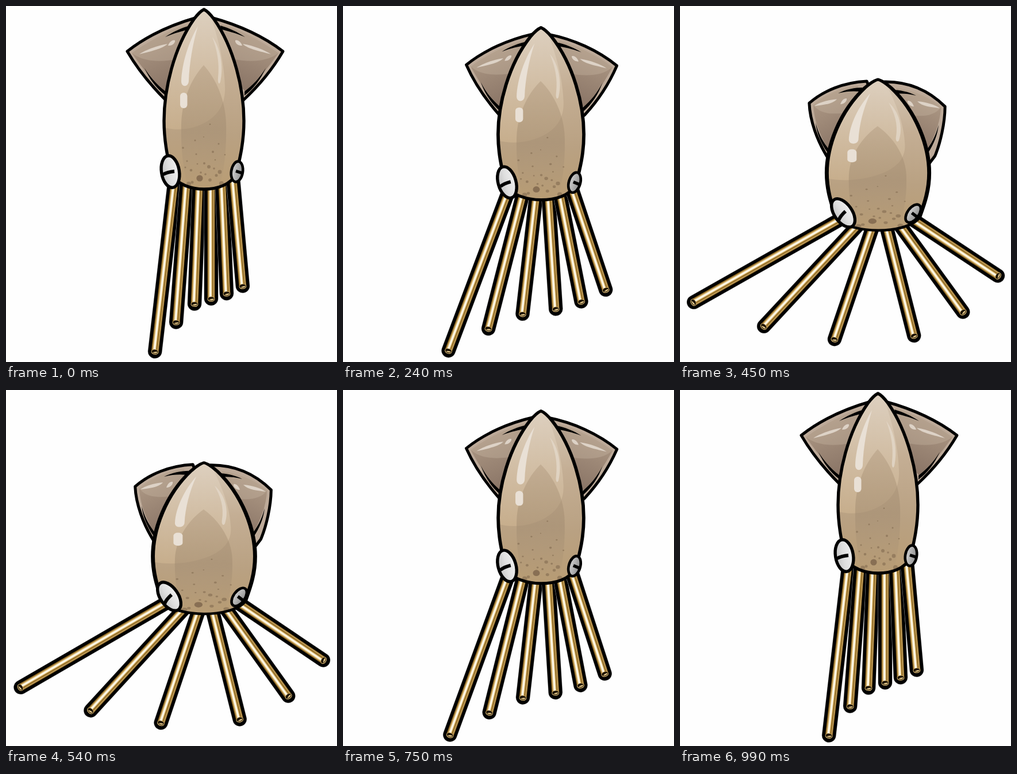
Write an HTML page that moves like this. It is 576 by 620 pixels and loops after 1020 ms.

```html
<!DOCTYPE html>
<html lang="en">
<head>
<meta charset="utf-8">
<title>Squid</title>
<style>
  html, body { margin: 0; width: 100%; height: 100%; overflow: hidden; background: #fefefe; }
  svg { display: block; width: 576px; height: 620px; }
</style>
</head>
<body>
<svg viewBox="0 0 576 620">
  <defs>
    <linearGradient id="skin" x1="0" y1="0" x2="0" y2="1">
      <stop offset="0" stop-color="#d6c8b6"/>
      <stop offset=".35" stop-color="#c4ae94"/>
      <stop offset=".7" stop-color="#b9a182"/>
      <stop offset="1" stop-color="#b99d74"/>
    </linearGradient>
    <linearGradient id="glow" x1="0" y1="0" x2="0" y2="1">
      <stop offset="0" stop-color="#dfd2c2"/>
      <stop offset="1" stop-color="#c9b08e"/>
    </linearGradient>
    <linearGradient id="arch" x1="0" y1="0" x2="0" y2="1">
      <stop offset="0" stop-color="#a48c70" stop-opacity=".34"/>
      <stop offset=".5" stop-color="#a08a70" stop-opacity=".5"/>
      <stop offset="1" stop-color="#a08a70" stop-opacity="0"/>
    </linearGradient>
    <linearGradient id="panel" x1="0" y1="0" x2=".35" y2="1">
      <stop offset="0" stop-color="#b4a08c"/>
      <stop offset=".5" stop-color="#a18c7a"/>
      <stop offset="1" stop-color="#8c7768"/>
    </linearGradient>
    <linearGradient id="tube" gradientUnits="userSpaceOnUse" x1="-6.5" y1="0" x2="6.5" y2="0">
      <stop offset="0" stop-color="#6b4c14"/>
      <stop offset=".14" stop-color="#b18a40"/>
      <stop offset=".28" stop-color="#f3dfb0"/>
      <stop offset=".38" stop-color="#fffdf6"/>
      <stop offset=".5" stop-color="#fff6dd"/>
      <stop offset=".6" stop-color="#c9a256"/>
      <stop offset=".72" stop-color="#85601c"/>
      <stop offset=".86" stop-color="#cfab66"/>
      <stop offset="1" stop-color="#6b4c14"/>
    </linearGradient>
    <linearGradient id="white">
      <stop offset="0" stop-color="#c4c4c4"/>
      <stop offset=".45" stop-color="#dedede"/>
      <stop offset="1" stop-color="#f0f0f0"/>
    </linearGradient>
    <linearGradient id="grey">
      <stop offset="0" stop-color="#d2d2d2"/>
      <stop offset="1" stop-color="#8e8e8e"/>
    </linearGradient>
    <path id="shape" d="M344.5 6C338 9 333 15 327 23C292 73 275 145 275 200C275 235 281 262 287 290C296 312 325 319 344.5 319C366 319 392 312 401 291C408 262 414 235 414 200C414 145 397 73 362 23C356 15 351 9 344.5 6Z"/>
    <clipPath id="inside"><use href="#shape"/></clipPath>
  </defs>
  <g id="fins"></g>
  <g id="legs"></g>
  <g id="body">
    <use href="#shape" fill="url(#skin)"/>
    <g clip-path="url(#inside)">
      <path d="M260 205C290 221 325 216 350 201C374 186 382 165 381 140C380 105 372 60 350 0L260 0Z" fill="url(#glow)" opacity=".85"/>
      <path d="M344 103C322 127 306 165 305 205C304 250 308 285 318 325L370 325C380 285 384 250 383 205C382 165 366 127 344 103Z" fill="url(#arch)"/>
      <path d="M334 35C318 62 306 100 305 131C305 142 317 142 318 131C319 100 325 65 334 35Z" fill="#e9e0d5"/>
      <rect x="303" y="151" width="12.5" height="27" rx="6" fill="#e9e0d5"/>
      <path d="M359 54C373 72 379 105 373 132C371 138 368 134 369 125C372 98 367 76 359 54Z" fill="#e4d9ca" opacity=".8"/>
      <g id="spots" fill="#836b50"></g>
    </g>
    <use href="#shape" fill="none" stroke="#000" stroke-width="5.4" stroke-linejoin="round"/>
  </g>
  <g id="eyes" stroke="#000"></g>
</svg>
<script>
const LOOP = 1020, STEP = 30, HALF = 493;
// Squeeze amount at which the second pose of every pair is drawn
const POSE = 0.95;

const $ = id => document.getElementById(id);
const add = (parent, tag, attrs) => {
  const el = document.createElementNS('http://www.w3.org/2000/svg', tag);
  for (const k in attrs) el.setAttribute(k, attrs[k]);
  return parent.appendChild(el);
};
const lerp = (a, b, k) => a + (b - a) * k;
const NUM = /-?\d+(\.\d+)?/g;
// Blend every number of two strings that share one structure
const blend = (a, b, k) => {
  const to = b.match(NUM);
  let i = 0;
  return a.replace(NUM, v => lerp(+v, +to[i++], k).toFixed(2));
};

// Elements whose attribute moves between two poses
const tweens = [];
const tween = (el, attr, a, b) => tweens.push({ el, attr, a, b });

// Fins
const outlines = [
  ['M332 20C290 32 245 52 211 79C228 108 252 138 277 163L310 190L344 60Z',
   'M325 132C285 134 250 148 225 170C226 200 238 235 258 267L290 280L344 180Z'],
  ['M357 20C401 32 447 52 482 79C465 108 441 138 413 164L380 190L344 60Z',
   'M355 133C403 132 436 151 461 176C461 205 453 240 444 262L432 278L344 180Z']
];
const details = [
  ['M318 32C285 42 250 60 219 82C236 106 256 132 276 150L320 100Z',
   'M310 140C285 143 255 153 232 173C233 198 243 228 258 250L300 200Z',
   { fill: 'url(#panel)' }],
  ['M318 32C285 42 250 60 219 82C240 98 270 98 300 92Z',
   'M310 140C285 143 255 153 232 173C245 190 265 190 300 186Z',
   { fill: '#c9b7a4', opacity: .35 }],
  ['M320 34C306 38 290 45 277 54C294 47 308 43 318 41Z',
   'M318 143C305 143 288 146 275 153C290 149 303 149 313 150Z',
   { fill: '#000' }],
  ['M241 108C252 126 264 138 278 149L278 156C262 144 250 128 241 108Z',
   'M236 204C241 224 249 238 260 252L260 261C247 244 238 224 236 204Z',
   { fill: '#000' }],
  ['M232 84C242 77 262 69 281 66C272 75 250 79 232 84Z',
   'M234 175C242 169 258 164 273 163C265 172 248 173 234 175Z',
   { fill: '#ddd2c6' }],
  ['M282 69C284 63 290 58 294 60C295 64 289 70 282 69Z',
   'M279 172C281 165 286 161 290 162C291 166 286 172 279 172Z',
   { fill: '#ddd2c6' }]
];
outlines.forEach(([a, b], side) => {
  tween(add($('fins'), 'path', { fill: '#bdaa99' }), 'd', a, b);
  const g = add($('fins'), 'g', {});
  if (side) tween(g, 'transform', 'translate(693 0) scale(-1 1)', 'translate(686 4) scale(-1 1)');
  for (const [c, d, look] of details) tween(add(g, 'path', look), 'd', c, d);
  const edge = add($('fins'), 'path', {
    fill: 'none', stroke: '#000', 'stroke-width': 5, 'stroke-linejoin': 'round'
  });
  tween(edge, 'd', a, b);
});

// Spots: x, y, radius
[
  [337, 300, 5.6], [353, 280, 3], [372, 289, 3.4], [366, 295, 2.5], [355, 303, 2.8],
  [322, 286, 2.3], [345, 274, 2], [360, 254, 2], [308, 247, 1.8], [329, 234, 1.5],
  [355, 206, 1.3], [344, 228, 1], [370, 240, 1.5], [331, 258, 1.5], [315, 270, 1.5],
  [362, 283, 1.8], [324, 307, 2.5], [339, 290, 1.8], [347, 293, 1.8], [381, 259, 1.3],
  [318, 310, 4], [375, 309, 4], [312, 281, 1.5], [333, 275, 1.3], [364, 268, 1.3]
].forEach(([cx, cy, r]) => add($('spots'), 'circle', { cx, cy, r, opacity: r > 5 ? .9 : .6 }));

// Legs: joint on the body, tip when long, tip when squeezed
const squeeze = p => ({ sx: 1 + .3 * p, sy: 1 - .17 * p, y: 320 + 76 * p });
const place = (x, y, p) => {
  const s = squeeze(p);
  return [344.5 + (x - 344.5) * s.sx, s.y + (y - 320) * s.sy];
};
const polar = ([x, y], ex, ey) => [Math.hypot(ex - x, ey - y), Math.atan2(x - ex, ey - y) * 180 / Math.PI];

const legs = [
  [294.7, 295, 259, 603, 21.5, 515],
  [314, 314, 296, 552, 144, 558.5],
  [336, 318, 328, 520, 268, 582],
  [357, 318, 357, 511, 408, 576],
  [376, 312, 384, 502, 494, 534],
  [395, 300, 412, 489, 555, 470]
].map(([x, y, ax, ay, bx, by]) => {
  const g = add($('legs'), 'g', {});
  const line = (color, width) => add(g, 'line', {
    y1: -8, stroke: color, 'stroke-width': width, 'stroke-linecap': 'round'
  });
  const sleeve = [line('#aaa', 25), line('#000', 24)];
  const tube = add(g, 'rect', { x: -6.5, y: -10, width: 13, fill: 'url(#tube)' });
  const mouth = add(g, 'g', {});
  add(mouth, 'ellipse', { rx: 6.5, ry: 4.6, fill: '#d6b573' });
  add(mouth, 'ellipse', { cy: -.4, rx: 5.6, ry: 3.7, fill: '#1c1304' });
  add(mouth, 'path', { d: 'M-4 1.5Q1 -1.5 5 -.6Q3 3.6 -4 1.5Z', fill: '#e2c68a' });
  return { x, y, g, sleeve, tube, mouth,
    a: polar([x, y], ax, ay), b: polar(place(x, y, POSE), bx, by) };
});

// Eyes
const eye = (rx, ry, fill, width, a, b, bar, pa, pb) => {
  const ball = add($('eyes'), 'ellipse', { rx, ry, fill: `url(#${fill})`, 'stroke-width': width });
  tween(ball, 'transform', a, b);
  tween(add($('eyes'), 'path', { fill: 'none', 'stroke-width': bar }), 'd', pa, pb);
};
eye(15.5, 28, 'white', 5.4,
  'translate(286 288.5) rotate(-9)', 'translate(284 361) rotate(-35)',
  6, 'M273 293.5Q281 289 293 288', 'M276 374Q279 366 288 358');
eye(10, 18, 'grey', 4.6,
  'translate(402 288.5) rotate(9)', 'translate(405.8 362) rotate(36)',
  5.5, 'M400 287.5L411 291', 'M403.5 361L412 367.5');

// Cubic ease: control points (.64, 0) and (.8, 1)
const ease = u => {
  let lo = 0, hi = 1;
  for (let i = 0; i < 24; i++) {
    const s = (lo + hi) / 2, r = 1 - s;
    const x = 3 * s * r * r * .64 + 3 * s * s * r * .8 + s * s * s;
    if (x < u) lo = s; else hi = s;
  }
  return lo * lo * (3 - 2 * lo);
};

function draw(t) {
  const p = ease(Math.max(0, 1 - Math.abs(t - HALF) / HALF));
  const k = p / POSE;
  const s = squeeze(p);
  $('body').setAttribute('transform',
    `translate(344.5 ${s.y}) scale(${s.sx} ${s.sy}) translate(-344.5 -320)`);
  for (const { el, attr, a, b } of tweens) el.setAttribute(attr, blend(a, b, k));
  for (const leg of legs) {
    const [x, y] = place(leg.x, leg.y, p);
    const len = lerp(leg.a[0], leg.b[0], k);
    leg.g.setAttribute('transform', `translate(${x} ${y}) rotate(${lerp(leg.a[1], leg.b[1], k)})`);
    leg.sleeve.forEach(l => l.setAttribute('y2', len - 1.5));
    leg.tube.setAttribute('height', len + 9);
    leg.mouth.setAttribute('transform', `translate(0 ${len - .5})`);
  }
}

const start = performance.now();
function tick() {
  const t = (performance.now() - start) % LOOP;
  draw(Math.floor(t / STEP) * STEP);
  requestAnimationFrame(tick);
}
draw(0);
requestAnimationFrame(tick);
</script>
</body>
</html>
```
